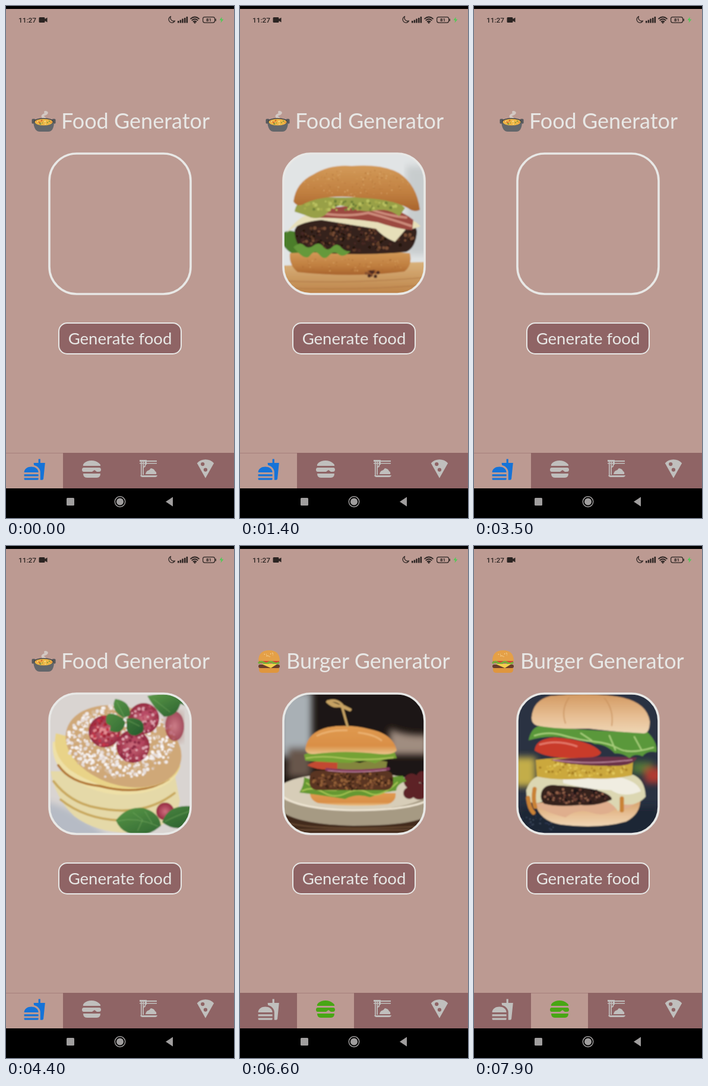
An HTML page for the animation above (8000 ms loop, 384x864 px).

```html
<!DOCTYPE html>
<html lang="en">
<head>
<meta charset="utf-8">
<title>Food Generator</title>
<style>
  html, body { margin: 0; height: 100%; overflow: hidden; background: #000; }
  svg { display: block; width: 100vw; height: 100vh; }
  text { font-family: Lato, sans-serif; fill: #e8e8e6; }
  .icon { fill: #c0bfbd; stroke: none; }
  .food-page #tab-food { fill: #1573d8; }
  .burger-page #tab-burger { fill: #48a614; }
  .food-page .burger-only, .burger-page .food-only { display: none; }
  .photo { opacity: 0; }
  .line { fill: none; stroke-linecap: round; stroke-linejoin: round; }
</style>
</head>
<body>
<svg id="screen" class="food-page" viewBox="0 0 384 864">
  <defs>
    <clipPath id="frame"><rect x="73" y="249" width="238" height="237" rx="46"/></clipPath>
    <filter id="soft"><feGaussianBlur stdDeviation=".8"/></filter>
    <filter id="blur"><feGaussianBlur stdDeviation="6"/></filter>
    <linearGradient id="bun" x2="0" y2="1"><stop stop-color="#d39a58"/><stop offset=".6" stop-color="#c07f40"/><stop offset="1" stop-color="#a9642c"/></linearGradient>
    <linearGradient id="brioche" x2="0" y2="1"><stop stop-color="#e09a50"/><stop offset=".7" stop-color="#d98f46"/><stop offset="1" stop-color="#eac48c"/></linearGradient>
    <linearGradient id="pale-bun" x2="0" y2="1"><stop stop-color="#d39a62"/><stop offset=".6" stop-color="#e7c096"/><stop offset="1" stop-color="#efd6b4"/></linearGradient>
    <linearGradient id="wood" x2="0" y2="1"><stop stop-color="#d9b27c"/><stop offset="1" stop-color="#b97d42"/></linearGradient>
    <linearGradient id="leaf" x2="1" y2="1"><stop stop-color="#5c9a48"/><stop offset="1" stop-color="#24592c"/></linearGradient>
    <radialGradient id="berry"><stop stop-color="#cf6f80"/><stop offset="1" stop-color="#94283f"/></radialGradient>
  </defs>

  <path fill="#bc9a92" d="M0 5h384v809H0z"/>

  <!-- status bar -->
  <g fill="#2b2422">
    <text x="21" y="28" style="font:500 11.8px Roboto,sans-serif;fill:#2b2422">11:27</text>
    <path d="M57 19h7q1.500 0 1.500 1.500v1.500l4-2.500v8l-4-2.500v1.500q0 1.500-1.500 1.500h-7q-1.500 0-1.500-1.500v-6q0-1.500 1.500-1.500z"/>
    <path class="line" stroke="#2b2422" stroke-width="1.300" d="M277.500 17.500a5.500 5.500 0 1 0 7 7.500a5.500 5.500 0 0 1-7-7.500z"/>
    <path d="M289 25h2.500v3.500H289zM292.700 23.500h2.500v5h-2.500zM296.300 21.500h2.500v7h-2.500zM300 20h2.500v8.500H300zM303.600 18h2.500v10.500h-2.500z"/>
    <path class="line" stroke="#2b2422" stroke-width="1.700" d="M311 21.500q7-6 14 0M313.300 24q4.700-4 9.400 0M315.500 26.500q2.500-2 5 0"/>
    <circle cx="318" cy="28" r="1.500"/>
    <rect x="331.600" y="18.600" width="20" height="9.500" rx="3" fill="none" stroke="#2b2422" stroke-width="1.200"/>
    <path d="M352.500 21.500h1.500v4h-1.500z"/>
    <text x="341.600" y="26.300" text-anchor="middle" style="font:700 8px Roboto,sans-serif;fill:#2b2422">81</text>
    <path fill="#53c957" d="M363.500 18.500l-4 5.500h3l-1 4.500l5-6h-3z"/>
  </g>

  <!-- titles -->
  <g class="food-only">
    <path class="line" stroke="#d8d3d0" stroke-width="4" opacity=".8" d="M65 189q-7-3 0-6t1-4"/>
    <path class="line" stroke="#55585c" stroke-width="3" d="M48 192h-3v5h5M79 192h3v5h-5"/>
    <path fill="#63666a" d="M46 194h35q0 18-10 18H57q-10 0-11-18z"/>
    <ellipse cx="63.500" cy="195" rx="17" ry="6" fill="#45484c"/>
    <ellipse cx="63.500" cy="196" rx="15" ry="5.500" fill="#eeb545"/>
    <g data-specks="63.5 196 13 4 18 1.4 #d9632c #f6dc83 #7c9a3c"></g>
    <text x="93" y="207" font-size="36">Food Generator</text>
  </g>
  <g class="burger-only">
    <path fill="#e5a047" d="M31 194q0-18 18-18t18 18z"/>
    <g data-specks="49 183 11 4 11 .8 #fbe6b1"></g>
    <path fill="#d64432" d="M32 194h34v4H32z"/>
    <path class="line" stroke="#78ae3b" stroke-width="3.500" d="M32 197q4-3 8 0t8 0t8 0t9 0"/>
    <rect x="31" y="200" width="36" height="6" rx="3" fill="#693d2b"/>
    <path fill="#f5cf4d" d="M36 199h27l-11 7z"/>
    <path fill="#df963e" d="M32 206h34v3q0 5-6 5H38q-6 0-6-5z"/>
    <text x="78" y="207" font-size="36">Burger Generator</text>
  </g>

  <!-- photos -->
  <g clip-path="url(#frame)"><g filter="url(#soft)">
    <g class="photo" id="beef">
      <path fill="#e1e4e5" d="M73 249h238v237H73z"/>
      <path fill="#c7cccd" filter="url(#blur)" d="M280 270h40v150h-40z"/>
      <path fill="url(#wood)" d="M73 438l238-6v60H73z"/>
      <path class="line" stroke="#a97140" stroke-width="1.500" opacity=".6" d="M73 464q110 5 240-6M80 476q120 4 230-5"/>
      <path fill="#4c7d2c" d="M73 382q18-8 32 8l8 30q-24 6-40-16z"/>
      <path fill="url(#bun)" d="M84 417q100-6 202 0q5 20-9 31q-88 11-180 1q-15-12-13-32z"/>
      <g data-specks="187 436 95 12 60 1.1 #dca867 #a76632"></g>
      <path fill="#35201a" d="M92 378q8-20 50-21h124q30 6 32 24q-2 27-18 34q-80 8-174-1q-14-14-14-36z"/>
      <g data-specks="194 390 100 23 210 3 #20120f #5d3a28 #794e36 #452820"></g>
      <path fill="#65993a" d="M90 407q11-10 18-3t16 0t16 2t15 1t15 0t16 7q-12 12-20 5t-16 2t-16-1t-16 1t-28-14z"/>
      <path fill="#e7dfb9" d="M78 383q24-34 58-38l128 7q28 6 40 20q-16 6-25 5l-18 21q-20-8-32-22l-92-15q-37 3-59 22z"/>
      <path fill="#9c4840" d="M118 357q18-16 50-18l60-6q42 10 64 28l-2 17q-26-2-58-13q-50-8-114-8z"/>
      <path class="line" stroke="#cc8b7a" stroke-width="4" d="M132 349q48 8 84 0q34 9 72 22M204 337q36 16 76 20"/>
      <path fill="#98a047" d="M92 347q2-18 24-24h120q30 4 42 18l-10 14q-18-14-40-10t-44-5t-36 8t-38 5z"/>
      <g data-specks="180 337 84 9 70 3 #bac160 #6f8037 #a9ad4d"></g>
      <path fill="url(#bun)" d="M90 330q4-32 34-46q28-17 64-14q52-4 80 12q30 20 35 62q-10 5-20-3q-30-16-78-17q-60-7-96 9q-12 8-19-3z"/>
      <g data-specks="196 299 88 23 130 1.1 #e3b77a #ad6e34 #d19a5b"></g>
      <g data-specks="222 451 13 6 18 3 #4c2920 #89512e"></g>
    </g>

    <g class="photo" id="pancakes">
      <path fill="#d9d4d1" d="M73 249h238v237H73z"/>
      <path fill="#b6bbc5" filter="url(#blur)" d="M60 430q60 10 120 70H60z"/>
      <path fill="#c3a6a0" filter="url(#blur)" d="M268 280h30v50h-30z"/>
      <path fill="#e5d9a8" d="M75 380q8 46 40 76q40 30 100 28q70-8 78-54l-10-50z"/>
      <path class="line" stroke="#c9a95e" stroke-width="4" d="M80 397q28 36 70 44q80 18 134-24M92 428q40 32 98 35"/>
      <path fill="#eee0a7" d="M79 330q-4 42 34 64q60 38 128 20q52-14 52-48z"/>
      <path class="line" stroke="#b27836" stroke-width="4" d="M88 370q20 30 70 35q70 18 116-12"/>
      <path fill="#e9d388" d="M84 316q-8 36 24 62q68 46 144 26q38-12 42-34z"/>
      <ellipse cx="198" cy="338" rx="100" ry="66" transform="rotate(17 198 338)" fill="#cfa878"/>
      <g data-specks="194 330 92 62 620 3.2 #f2ecea #e7dedb #fbf7f5 #d6b897"></g>
      <g fill="url(#berry)">
        <ellipse cx="284" cy="304" rx="16" ry="25" opacity=".75"/>
        <circle cx="166" cy="313" r="27"/><circle cx="232" cy="291" r="26"/><circle cx="214" cy="338" r="28"/>
        <circle cx="268" cy="448" r="15"/>
      </g>
      <g data-specks="166 313 24 24 60 3 #c53546 #e48c92 #a52637"></g>
      <g data-specks="232 291 23 23 60 3 #b84b66 #dda1ad #933049"></g>
      <g data-specks="214 339 25 25 70 3 #b54660 #e2a9b5 #8d2c45"></g>
      <g fill="url(#leaf)">
        <path d="M198 290q-24-14-14-32q27 4 25 28zM198 291q-34-20-29 8q17 14 29-6zM199 294q-24-4-24 18q22 8 26-14zM203 291q34-4 28 22q-20 16-28-4z"/>
        <path d="M238 253q32-8 58 2q-4 34-30 33q-18-16-28-35zM278 252h34v18q-18 2-34-18z"/>
        <path d="M185 463q18-24 46-21q28 8 30 30q-28 24-56 12q-14-6-20-21zM263 466q10-30 48-27v31q-26 14-48-4z"/>
      </g>
      <path class="line" stroke="#79ad62" opacity=".8" d="M188 464q32-8 68 9M214 450l16 12l-8 18M234 448l12 20M268 465q18-10 40-17M187 264l14 28l24 12M248 258l28 22"/>
    </g>

    <g class="photo" id="skewer">
      <path fill="#1d1613" d="M73 249h238v237H73z"/>
      <g filter="url(#blur)">
        <path fill="#a9b0b5" d="M66 245h55v110H66z"/>
        <path fill="#67564b" d="M80 340h40v50H80z"/>
        <path fill="#a08d80" d="M252 308q30 14 65 10v34h-65z"/>
      </g>
      <path fill="#422c1d" d="M73 446h238v40H73z"/>
      <path class="line" stroke="#684830" stroke-width="2" d="M76 466q50 16 230 7M90 479h200"/>
      <path fill="#a69a83" d="M73 410q110 40 238 14v34q-30 14-120 14q-88-2-118-22z"/>
      <ellipse cx="190" cy="414" rx="128" ry="32" fill="#d7cdb8"/>
      <path class="line" stroke="#eee5d3" stroke-width="3" d="M74 424q28 20 116 22q86 0 120-14"/>
      <g fill="#5d2228"><circle cx="289" cy="397" r="13"/><circle cx="302" cy="414" r="14"/><circle cx="285" cy="417" r="10"/><circle cx="307" cy="390" r="10"/></g>
      <path fill="url(#brioche)" d="M118 417h144q2 14-14 19q-56 6-116-2q-14-5-14-17z"/>
      <path fill="#659831" d="M100 416q8-12 8-26q20 8 50 14h60q28-16 56-16l6 9q-16 4-17 16q-24 2-44 11q-22-7-42 3q-36-6-77-11z"/>
      <path class="line" stroke="#a3c252" stroke-width="2.500" d="M105 413q18-8 36 3t38 1t38 0t48-18M112 400q18 13 50 12"/>
      <rect x="117" y="379" width="141" height="33" rx="13" fill="#5a3520"/>
      <g data-specks="188 396 68 15 150 2.6 #7d4e30 #3b2117 #946138"></g>
      <path fill="#c34830" d="M113 370q20-13 52-6v12q-30 5-52-6z"/>
      <path fill="#83863c" d="M164 366q12-6 38 0q24-8 46-2l-2 12q-44 6-82 0z"/>
      <path class="line" stroke="#84395c" stroke-width="5" d="M146 377q46 6 104-1"/>
      <path class="line" stroke="#cda1b3" stroke-width="1.200" d="M148 379q50 5 98-1"/>
      <path fill="#75a236" d="M108 352q20-9 52-5h100l4 11q-26 1-36 9q-18-8-42-1q-48-1-76-4z"/>
      <path class="line" stroke="#a9c258" stroke-width="2.500" d="M112 358q26-5 60 0t86-1"/>
      <path fill="url(#brioche)" d="M110 342q4-28 38-36q34-6 70 3q40 8 46 36q-6 8-30 6q-58-7-108 0q-16 1-16-9z"/>
      <path class="line" stroke="#f0bd7f" stroke-width="3" opacity=".7" d="M130 320q20-10 50-9M200 315q26 3 38 13"/>
      <path class="line" stroke="#c6a263" stroke-width="4" d="M181 304l-9-32M148 262l37 15M147 263q14-6 25 5q-12 7-25-5M174 270l12 6"/>
    </g>

    <g class="photo" id="pineapple">
      <path fill="#293142" d="M73 249h238v237H73z"/>
      <g filter="url(#blur)">
        <path fill="#c3ad48" d="M66 356h38v50H66z"/>
        <path fill="#4f7838" d="M266 364h35v20h-35z"/>
        <path fill="#b13a32" d="M288 374h30v26h-30z"/>
        <path fill="#1b2536" d="M73 440h240v50H73z"/>
      </g>
      <g data-specks="105 468 40 15 40 1 #526078 #3c496d"></g>
      <path fill="url(#pale-bun)" d="M103 434q90-12 177-9q2 26-24 40q-46 13-110 5q-36-6-43-36z"/>
      <path fill="#dfae8d" d="M100 436q70-10 176-12q-6 22-38 20q-18 14-40 6t-44 8q-30-7-54-22z"/>
      <path fill="#dcd7b2" d="M88 412q8-24 30-26h150q20 8 21 37q-14 16-36 13l-10 12q-14-20-30-18l-90-3q-18 13-34 2z"/>
      <path fill="#f0ede1" d="M150 390h95q32 8 36 24q-30 12-50-2q-36 0-81-12z"/>
      <path fill="#34201f" d="M113 418q4-18 28-14q40 2 62 7q30 8 29 17q-26 12-52 9q-40 4-62-2q-7-7-5-17z"/>
      <g data-specks="172 422 53 13 100 2.600 #1c1316 #6a3f33 #472926 #94624a"></g>
      <path class="line" stroke="#c98235" stroke-width="7" d="M91 425q2 18 9 25M102 410q-3 18 1 30M249 426v20"/>
      <path fill="#cba83d" d="M104 361q78-10 164 2l-2 24q-36 8-74 5q-50 5-86-3z"/>
      <g data-specks="186 375 76 13 90 2.600 #e2c85c #a98227 #d8b645"></g>
      <path fill="#6b3046" d="M129 361q70-8 145-4q-4 13-34 14q-70 1-111-10z"/>
      <path class="line" stroke="#b98499" stroke-width="2" d="M134 361q60 9 132 0"/>
      <path fill="#c93a2a" d="M102 345q2-20 34-22q60 4 78 25q-2 9-28 9q-60 4-84-12z"/>
      <path class="line" stroke="#e4796a" stroke-width="3" d="M111 335q30-9 62 3"/>
      <path fill="#5a983a" d="M92 328q4-22 20-25q80 10 180 11q18 18 15 34q-15-4-23 7q-13-6-22 3q-14-10-25-8q-14-16-34-16q-22-12-44-9q-30-8-67 3z"/>
      <path class="line" stroke="#a9cf7c" stroke-width="2.500" d="M102 320q24-8 50 0t50 10t42 12t58-2M180 316l18 12M228 320l10 24M270 322l12 22"/>
      <path fill="url(#pale-bun)" d="M97 290q2-30 32-37q60-6 112 1q50 8 55 42q0 22-12 20q-40-2-92-8q-52 2-86-5q-9-3-9-13z"/>
      <path class="line" stroke="#c68f5b" stroke-width="2" opacity=".7" d="M160 256q-14 20-6 43M220 257q16 20 12 46"/>
    </g>
  </g></g>
  <rect x="73" y="249" width="238" height="237" rx="46" fill="none" stroke="#e8e8e6" stroke-width="3.600"/>

  <g id="button">
    <rect x="89" y="535" width="206" height="52" rx="14" fill="#8f6465" stroke="#e8e8e6" stroke-width="2"/>
    <text x="192" y="571" font-size="27.500" text-anchor="middle">Generate food</text>
  </g>

  <!-- tab bar -->
  <path fill="#8f6465" d="M0 754h384v60H0z"/>
  <path id="active-tab" fill="#bc9a92" d="M0 754.500h96v59.500H0z"/>
  <circle id="touch" cx="118" cy="774" r="6" opacity=".12"/>
  <path class="icon" id="tab-food" transform="translate(29 763) scale(1.600)" d="M18 23h1.700c.8 0 1.500-.6 1.600-1.500L23 5h-5V1h-2v4h-5l.3 2.400c1.700.5 3.300 1.300 4.300 2.300 1.400 1.400 2.400 2.900 2.400 5.300zM1 21h15v1q0 1-1 1H2q-1 0-1-1zM16 15c0-8-15-8-15 0zM1 17h15v2H1z"/>
  <path class="icon" id="tab-burger" d="M130 776q-1-2 2-5q5-4 12-4t12 4q4 3 3 5zM131 779h26q3 0 3 3.500t-4 3.500h-3l-4-3l-4 3h-14q-3 0-3-3.500t3-3.500zM130 789h29q0 7-6 7h-17q-6 0-6-7z"/>
  <path class="icon" d="M225 767h29v2h-29zM225 771h29v1.500h-29zM227 767h1.700v26H227zM230.300 767h1.700v24h-1.700zM233.700 767h1.700v8q0 3-3.500 4v-2q2-1 1.800-3zM225 766h12v8h-2v-6h-10zM235 790q1-5 4-6t5-4q6 1 7 5q3 1 2 5zM226 792h29q-1 3-4 3h-21q-3 0-4-3z"/>
  <path class="icon" fill-rule="evenodd" transform="translate(317 762) scale(1.580)" d="M12 2Q6.500 2 3 6l9 16l9-16q-3.500-4-9-4zM9 5a2 2 0 1 1 0 4a2 2 0 1 1 0-4zM12 11a2 2 0 1 1 0 4a2 2 0 1 1 0-4z"/>

  <!-- system navigation -->
  <g fill="#a09e9e">
    <rect x="102" y="830" width="13" height="13" rx="1.500"/>
    <circle cx="192" cy="836.500" r="6"/>
    <circle cx="192" cy="836.500" r="8.700" fill="none" stroke="#a09e9e" stroke-width="1.500"/>
    <path d="M281 828.500v16l-12-8z"/>
  </g>
</svg>
<script>
const LOOP = 8000, FADE = 300, PAGE_SWITCH = 5300;
const byId = id => document.getElementById(id);
const photos = [
  { id: "beef", from: 350, to: 2900 },
  { id: "pancakes", from: 3750, to: PAGE_SWITCH },
  { id: "skewer", from: PAGE_SWITCH - FADE, shown: PAGE_SWITCH, to: 6800 },
  { id: "pineapple", from: 7450, to: LOOP },
];
const presses = [[2700, 2900], [6300, 6600]];

let seed = 7;
const random = () => (seed = seed * 16807 % 2147483647) / 2147483647;

// Scatter round specks inside an ellipse: cx cy rx ry count size colours...
for (const group of document.querySelectorAll("[data-specks]")) {
  const [cx, cy, rx, ry, count, size, ...colors] = group.dataset.specks.split(" ");
  let dots = "";
  for (let i = 0; i < count; i++) {
    const angle = random() * 2 * Math.PI, reach = Math.sqrt(random());
    const x = +cx + rx * reach * Math.cos(angle), y = +cy + ry * reach * Math.sin(angle);
    const r = size * (0.5 + random() / 2);
    dots += `<circle cx="${x}" cy="${y}" r="${r}" fill="${colors[i % colors.length]}"/>`;
  }
  group.innerHTML = dots;
}

const within = (t, from, to) => t >= from && t < to;

function draw(now) {
  const t = now % LOOP;
  const burgerPage = t >= PAGE_SWITCH;
  byId("screen").setAttribute("class", burgerPage ? "burger-page" : "food-page");
  byId("active-tab").setAttribute("transform", `translate(${burgerPage ? 96 : 0})`);
  byId("touch").style.display = within(t, PAGE_SWITCH, PAGE_SWITCH + 100) ? "" : "none";
  byId("button").style.opacity = presses.some(([from, to]) => within(t, from, to)) ? 0.75 : 1;
  for (const { id, from, shown = from, to } of photos) {
    byId(id).style.opacity = within(t, shown, to) ? Math.min(1, (t - from) / FADE) : 0;
  }
  requestAnimationFrame(draw);
}
requestAnimationFrame(draw);
</script>
</body>
</html>
```
